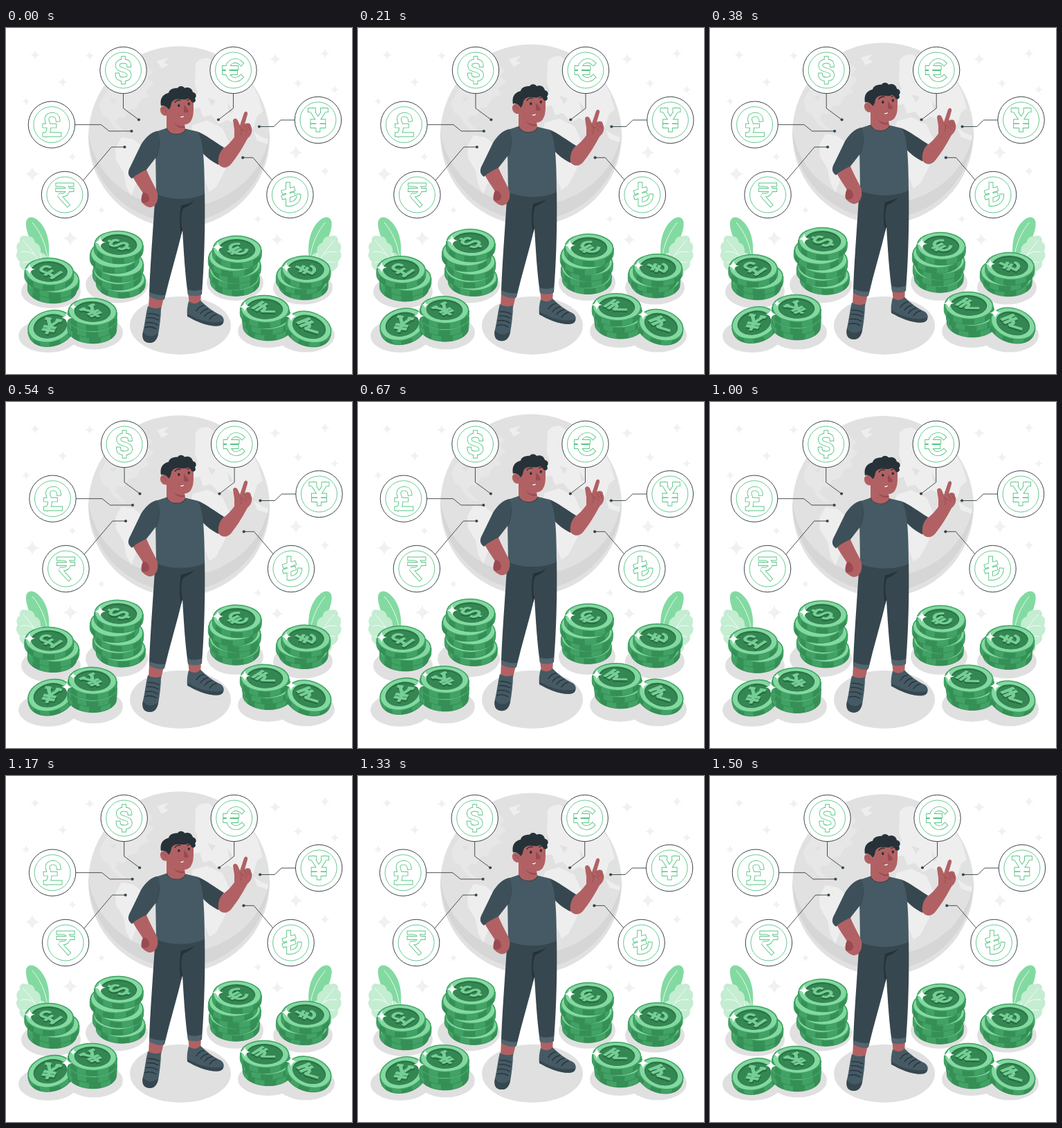
These frames come from a looping animation (500x500 px, 1.54 s). An HTML page:

```html
<!DOCTYPE html>
<html lang="en">
<head>
<meta charset="utf-8">
<title>World currencies</title>
<style>
html, body { margin: 0; width: 100%; height: 100%; overflow: hidden; background: #fff; }
svg { display: block; width: 100vw; height: 100vh; }
</style>
</head>
<body>
<svg id="stage" viewBox="0 0 500 500" xmlns="http://www.w3.org/2000/svg"></svg>
<script>
const INK = '#263238', GREEN = '#55c583', SKIN = '#b16163', SHADE = '#9a4a50';
const SHIRT = '#455a64', PANTS = '#37474f';

const path = (d, fill, extra = '') => `<path d="${d}" fill="${fill}" ${extra}/>`;
const line = (d, color, w = 1, extra = '') =>
  `<path d="${d}" fill="none" stroke="${color}" stroke-width="${w}" ${extra}/>`;
const oval = (x, y, rx, ry, fill, extra = '') =>
  `<ellipse cx="${x}" cy="${y}" rx="${rx}" ry="${ry}" fill="${fill}" ${extra}/>`;
const group = (body, attrs = '') => `<g ${attrs}>${body}</g>`;
const round = 'stroke-linecap="round" stroke-linejoin="round"';
const block = 'stroke-linecap="square" stroke-miterlimit="1.8"';

function star(x, y, r, fill, waist = 0.16) {
  const k = r * waist;
  return path(`M${x} ${y - r}Q${x + k} ${y - k} ${x + r} ${y}Q${x + k} ${y + k} ${x} ${y + r}` +
    `Q${x - k} ${y + k} ${x - r} ${y}Q${x - k} ${y - k} ${x} ${y - r}Z`, fill);
}

// Centre lines of the currency signs
const signs = {
  dollar: 'M8.2-7.5C8-11.500 4.500-13 0-13C-5-13-8.300-11-8.300-7C-8.300-2.500-4.500-1.300 0-.2C5 1 8.500 2.600 8.500 7.200C8.500 11 5 13 0 13C-5 13-8.300 11-8.500 7M0-14V-17M0 14V17',
  pound: 'M9-7.500C8.500-12 5.500-14.500 1-14.500C-4-14.500-7-12-7-8C-7-4-4-1-4 5C-4 9-5.500 12-8 14.300M-10 14.300H11M-10 1.500H4',
  rupee: 'M-10.500-14.500H10.500M-10.500-7H10.500M-7-14.500H-4C7-14.500 7 .5-4 .5H-8.500L4 14.500',
  euro: 'M11-10C4-16.500-8.500-14.500-8.500 0C-8.500 14.500 4 16.500 11 10M-13-3.500H4M-13 3.500H3',
  yen: 'M-9-14L0 0L9-14M-11.500-14.300H-6.500M6.500-14.300H11.500M0 0V14M-8 2H8M-8 8.500H8',
  lira: 'M-3-15V13.500C6 14 12 9 12.500 2M-9-4L4-8M-9 3.500L4-.5'
};

function icon(name, x, y, link, dx, dy) {
  const d = signs[name], w = name === 'rupee' ? 4.2 : 5;
  return line(link, INK, 0.85) + oval(dx, dy, 2.1, 2.1, PANTS) +
    oval(x, y, 33.7, 33.7, '#fff', `stroke="${INK}" stroke-width=".9"`) +
    oval(x, y, 26, 26, 'none', `stroke="${GREEN}" stroke-width=".9"`) +
    group(line(d, GREEN, w + 1.8, block) + line(d, '#fff', w, block),
      `transform="translate(${x} ${y})"`);
}

function sideBand(a, b, rx, ry, h, fill) {
  const top = [], low = [];
  for (let i = 0; i <= 6; i++) {
    const t = (a + (b - a) * i / 6) * Math.PI / 180;
    const x = (rx * Math.cos(t)).toFixed(1), y = ry * Math.sin(t);
    top.push(`${x} ${y.toFixed(1)}`);
    low.unshift(`${x} ${(y + h).toFixed(1)}`);
  }
  return path('M' + top.concat(low).join('L') + 'Z', fill);
}

function coin(x, y, o = {}) {
  const { rx = 35.5, ry = 20, h = 8, tilt = 2, sign, turn = 0, spin = 0 } = o;
  let s = path(`M${-rx} 0V${h}A${rx} ${ry} 0 0 0 ${rx} ${h}V0Z`, '#42a265',
    'stroke="#318a51" stroke-width=".8"');
  for (const [a, b] of [[20, 48], [76, 104], [128, 150]])
    s += sideBand(a + spin, b + spin, rx, ry, h, '#358f56');
  s += oval(0, 0, rx, ry, '#3fa463') + oval(0, 0.2, rx - 1.7, ry - 1.3, '#83d9a1');
  if (sign) {
    const flat = `scale(1 ${ry / rx * 1.05}) rotate(${turn}) scale(.92)`;
    const mark = (dy, color) => group(line(signs[sign], color, 5.6, block),
      `transform="translate(0 ${dy}) ${flat}"`);
    s += oval(0, 0, rx * 0.74, ry * 0.74, '#2b7546') +
      oval(0, 1.3, rx * 0.71, ry * 0.68, '#348752') +
      mark(2.4, '#286b41') + mark(0, '#75cf95');
  }
  return group(s, `transform="translate(${x} ${y}) rotate(${tilt})"`);
}

// Coins are listed from bottom to top; the last one shows its face
function stack(list, sign, turn) {
  return list.map(([x, y], i) =>
    coin(x, y, i === list.length - 1 ? { sign, turn } : { spin: i * 7 - 8 })).join('');
}

function leaves() {
  return path('M61 336C43 329 27 295 29 280C31 272 39 272 45 277C60 289 65 312 61 336Z', '#83daa1') +
    line('M60 333C58 313 50 295 38 281', '#fff', 0.8) +
    path('M66 370C53 372 41 369 34 362C29 360 28 355 29 352C22 349 18 343 20 338C15 333 13 327 17 323' +
      'C14 317 15 311 20 309C18 302 24 298 30 301C37 300 41 304 42 310C48 312 51 318 50 324' +
      'C57 326 60 331 59 336C65 341 67 350 66 370Z', '#c4edd2') +
    line('M63 368C52 342 39 322 25 307M50 344C42 338 31 337 24 339M40 327C34 323 27 322 21 324M50 344C51 337 51 330 49 326', '#fff', 0.8);
}

function globe() {
  const land = '#eeeeee';
  return oval(250, 157.500, 131, 131, '#e1e1e1') +
    path('M119 150A131 131 0 0 0 381 150A131.500 120 0 0 1 119 150Z', '#d6d6d6') +
    path('M135 111C144 91 160 73 181 60L201 55L212 64L205 73L214 80L202 91L207 99L195 104L188 116L177 119L171 130L162 129L158 137L166 145L174 152L165 151L154 142L147 130L139 126Z', land, 'opacity=".5"') +
    path('M167 158L184 161L204 177L211 187L205 202L194 211L187 228L181 243L174 230L170 209L159 191L158 174Z', land) +
    path('M218 48L235 43L228 51L236 53L225 59Z', land) +
    path('M274 58C271 48 284 42 293 44L309 56L330 59L351 74L364 97L371 121L363 127L357 146L347 139L341 151L331 139L320 133L308 139L296 126L285 129L280 115L269 117L267 104L277 94L273 82Z', land) +
    path('M270 140L291 134L313 145L322 165L332 170L321 188L316 207L304 230L294 237L286 218L283 196L269 188L263 163Z', land) +
    path('M358 150L370 158L379 161L378 168L363 163Z', land) +
    path('M150 104L160 102L156 110ZM165 92L174 88L171 96ZM291 101L303 105L298 113ZM320 108L328 121L323 124Z', '#e1e1e1');
}

function shoes() {
  return path('M207 386L228 390L224 407L206 405Z', SKIN) +
    path('M263 382L282 382L281 400L265 400Z', SKIN) +
    path('M205 402C211 406 218 406 224 404C224 417 222 431 220 443C218 453 212 456 206 455C199 454 196 449 198 439C201 426 202 413 205 402Z', SHIRT) +
    path('M198 439C202 447 213 448 220 441C218 453 212 456 206 455C199 454 196 449 198 439Z', PANTS) +
    line('M205 413Q213 412 221 416M204 419Q212 418 220 422M202 426Q211 424 219 429M201 433Q209 430 217 435', INK, 1.3, round) +
    path('M264 395C270 400 277 399 281 394C289 402 299 410 310 415C316 419 316 425 312 429C300 433 287 429 277 423L262 417C261 410 262 402 264 395Z', SHIRT) +
    path('M262 413C276 421 295 429 314 424C314 428 311 431 305 431C290 431 274 424 262 417Z', PANTS) +
    line('M275 409Q279 402 286 401M281 413Q285 407 292 406M287 417Q291 411 298 410M294 421Q298 415 304 414', INK, 1.3, round);
}

function trousers() {
  return path('M216 235L287 235C288 278 287 335 283 385C276 388 269 387 263 385C259 359 257 326 255 292C247 326 237 358 229 392C221 393 213 391 207 387C208 350 212 300 216 235Z', PANTS) +
    path('M255 292C252 280 253 268 256 261C263 258 268 255 272 250C266 254 259 255 253 257C251 269 250 282 253 299Z', INK) +
    path('M207.500 382C215 386 223 387 230 386L228 393C220 394 213 392 207 388Z', '#52656f') +
    path('M262 378C269 381 277 380 283 378L282 386C275 388 269 388 263 386Z', '#52656f');
}

function torso() {
  return path('M232 124L257 133L260 151C253 157 239 157 232 150Z', SKIN) +
    path('M243 138C248 142 253 143 258 142L258 144C252 146 246 143 243 138Z', SHADE) +
    path('M277 150C289 155 302 165 315 173C311 180 308 189 307 198C297 193 290 187 284 181Z', PANTS) +
    path('M217 150L232 145C236 156 255 157 260 146L277 150C284 161 287 184 287 240C266 250 236 249 217 240L216 177Z', SHIRT) +
    line('M232 145C236 156 255 157 260 146', PANTS, 1.2);
}

function leftArm() {
  return path('M183 213L202 203C207 215 213 226 218 236C221 244 219 254 213 258C206 262 200 256 196 252C195 247 196 243 198 239C193 231 187 223 183 215Z', SKIN) +
    path('M198 238C203 237 207 242 207 248C206 252 202 254 196 252C195 247 196 242 198 238Z', SHADE) +
    path('M219 149C209 151 201 159 195 169L180 200C176 207 175 213 182 218C188 212 196 208 203 205L217 187C224 174 223 158 219 149Z', '#3d5059') +
    line('M217 188C220 179 222 171 221 162', PANTS, 1);
}

function rightArm() {
  return path('M313 175C319 171 325 165 330 158L330 147L328 134C329 130 333 130 335 134L338 141L344 123C346 119 350 121 349 125L345 139C350 136 354 138 354 142C357 148 355 155 349 160C342 173 334 186 326 196C321 203 312 204 307 197C306 188 308 181 313 175Z', SKIN) +
    line('M338 143C341 147 341 151 339 155M344 140L349 147M349 140L353 148M340 147C344 146 346 148 348 151', SHADE, 0.9, round);
}

function head() {
  return path('M229 108C229 96 239 88 251 89C266 89 272 99 271 111C271 120 271 127 268 132C265 140 255 140 247 137C239 135 233 128 231 122Z', SKIN) +
    path('M223 116C224 111 230 110 234 114L236 124C231 129 222 125 223 116Z', SKIN) +
    path('M224 112C222 102 226 95 235 93C236 87 243 86 248 86C251 82 256 83 258 86C264 84 269 87 270 92C275 93 276 98 273 101C276 105 271 109 268 106C267 102 263 100 261 102C254 104 247 100 242 104C237 107 240 113 235 117C232 112 227 110 224 112Z', INK) +
    line('M226 116C229 115 231 117 231 121', SHADE, 0.9, round) +
    oval(249.800, 111.500, 1.700, 2.100, INK) + oval(264.300, 109, 1.700, 2.100, INK) +
    line('M244 107C246 104 249 103 252 104M262 104C264 102 267 102 269 104', INK, 1.3, round) +
    path('M257 110C260 114 264 117 264 120C263 122 260 122 257 121Z', SHADE) +
    path('M251 126.500C253 127.500 255 127 257 125.500C257 129 253 130 251 126.500Z', '#fff') +
    line('M250 126C253 127.500 255 127 257.500 125', SHADE, 0.8, round);
}

const dust = [[42, 39, 7], [121, 40, 7], [82, 78, 7], [29, 106, 6], [38, 211, 11], [96, 186, 6],
  [138, 263, 6], [93, 304, 11], [389, 45, 8], [461, 37, 7], [422, 80, 7], [475, 89, 6],
  [419, 180, 10], [461, 207, 7], [364, 276, 6], [392, 306, 9]];

const shadows = [[252, 430, 73, 42], [65, 381, 43, 24], [160, 371, 45, 26.500], [331, 368, 41, 26],
  [429, 375, 43, 24.500], [61, 445, 43, 24], [127, 440, 42, 24.500], [378, 438, 43, 24], [433, 444, 42, 24.500]];

const icons =
  icon('dollar', 169.600, 61, 'M169.600 94V116L192 132.500', 192, 132.500) +
  icon('pound', 66, 139.700, 'M98 139.700H137.500L149 149H181', 181.500, 149) +
  icon('rupee', 85, 241, 'M111 221L152.500 172H171', 171.500, 172) +
  icon('euro', 328.600, 61, 'M328.600 94V116L307 132.500', 307, 132.500) +
  icon('yen', 451, 133, 'M418 133H397L387 142.500H366', 366, 142.500) +
  icon('lira', 410.500, 241, 'M385 220L357 187.300H342', 342.300, 187.300);

const glints = [[34, 349, 8], [136, 310, 8], [306, 317, 8], [405, 346, 7],
  [88, 419, 8], [97, 403, 5], [345, 403, 8], [412, 417, 8]];

const coins =
  stack([[67, 370], [70.500, 363], [62.500, 352]], 'pound', -50) +
  stack([[166, 362.500], [161, 351], [163.500, 340], [157, 327], [163, 313]], 'dollar', -60) +
  stack([[331, 359.500], [329, 350], [333, 341], [328, 332], [334, 320]], 'euro', -42) +
  stack([[430, 365], [426, 358], [433.500, 349]], 'lira', -55) +
  coin(64, 431, { rx: 33.500, ry: 23, h: 6, tilt: -15, sign: 'yen', turn: 32 }) +
  stack([[124.500, 428], [125, 420], [125, 410]], 'yen', -38) +
  stack([[378, 424], [377, 416], [374, 406]], 'rupee', -50) +
  coin(438, 432, { rx: 33.500, ry: 22, h: 6, tilt: 18, sign: 'rupee', turn: -50 }) +
  glints.map(g => star(...g, '#fff', 0.09)).join('');

document.getElementById('stage').innerHTML =
  dust.map(s => star(...s, '#f1f1f1')).join('') +
  group(globe(), 'class="float"') +
  leaves() + group(leaves(), 'transform="translate(499.500 0) scale(-1 1)"') +
  shadows.map(s => oval(...s, '#e0e0e0')).join('') +
  group(icons, 'id="icons"') +
  group(shoes() + trousers() + torso() + leftArm() + rightArm() +
    group(head(), 'transform="translate(0 .8)"') + coins, 'class="float"');

const floats = document.querySelectorAll('.float');
const iconGroup = document.getElementById('icons');
const LOOP = 1540, CYCLE = 1500, TICK = 1000 / 24, LEAD = 11;
const shake = [0, -1, 2, -4, 4, -4, 4, -4, 2, -1, 0];

function draw(ms) {
  // Motion advances at 24 pictures a second and rests briefly at the end
  const tick = Math.min(36, Math.floor((ms % LOOP + 5) / TICK));
  const u = (tick * TICK + LEAD) / CYCLE % 1;
  const lift = -10 * (1 - Math.abs(2 * u - 1));
  const i = Math.floor(u * 10);
  const sway = shake[i] + (shake[i + 1] - shake[i]) * (u * 10 - i);
  for (const g of floats) g.setAttribute('transform', `translate(0 ${lift.toFixed(3)})`);
  iconGroup.setAttribute('transform', `translate(${sway.toFixed(3)} 0)`);
}

const start = performance.now();
function loop() {
  draw(performance.now() - start);
  requestAnimationFrame(loop);
}
loop();
</script>
</body>
</html>
```
